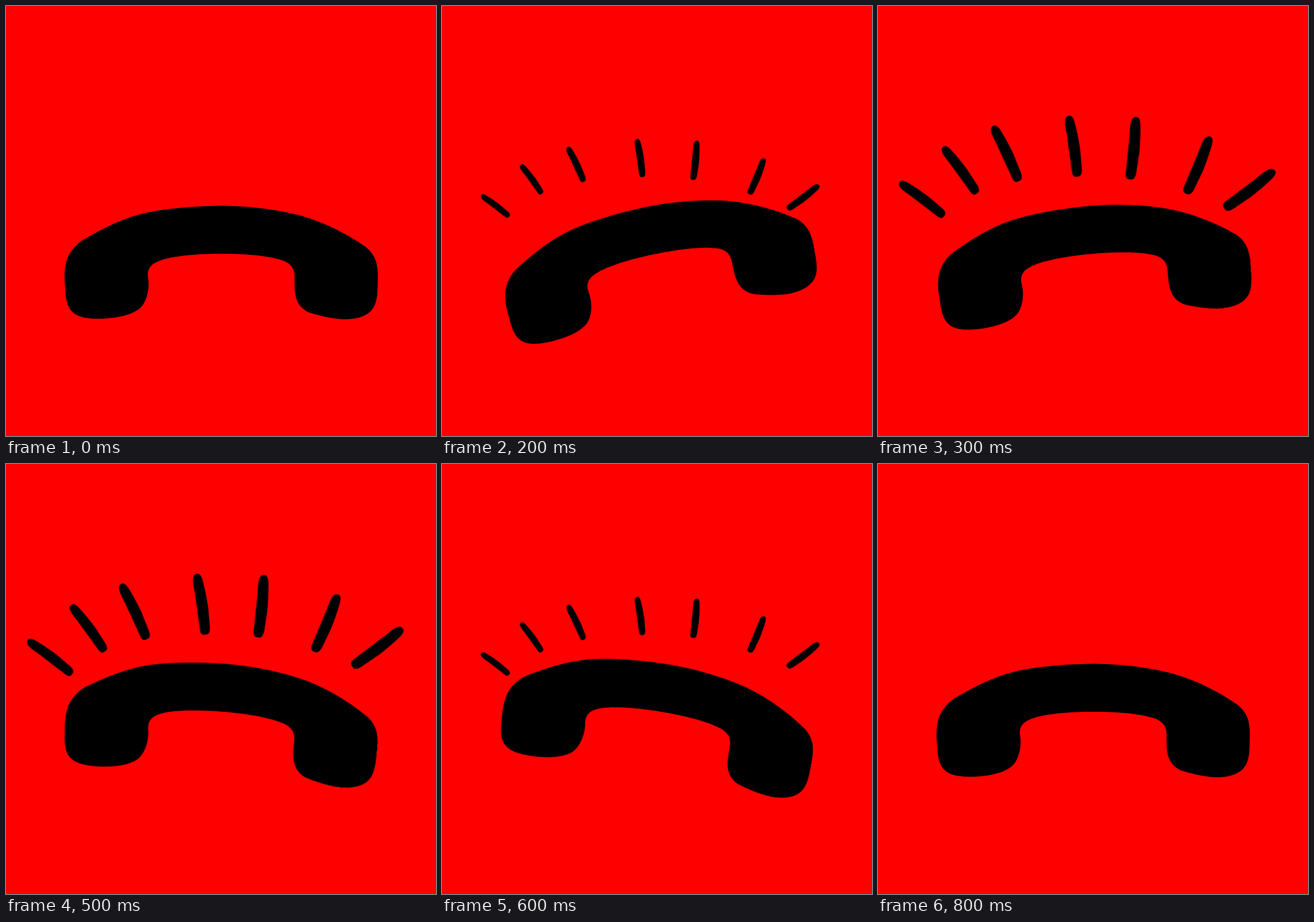
Recreate the animation shown at these times as an HTML page. Size 748 by 748 pixels, loop 1800 ms.

```html
<!DOCTYPE html>
<html lang="en">
<head>
<meta charset="utf-8">
<title>Ringing phone</title>
<style>
  html, body { margin: 0; width: 100%; height: 100%; overflow: hidden; background: #f00; }
  svg { display: block; width: 100vw; height: 100vh; }
  .handset { transform-origin: 375px 446px; animation: ring 1800ms step-end infinite; }
  .ray { transform: scale(0); animation: grow 1800ms step-end infinite; }

  /* one step is 100 ms = 5.555% */
  @keyframes ring {
    0%, 22.222%, 44.444%, 100% { transform: none; }
    5.555%, 16.666% { transform: rotate(-5deg); }
    11.111% { transform: rotate(-11.5deg); }
    27.777%, 38.888% { transform: translate(2px) rotate(4.8deg); }
    33.333% { transform: translate(4.5px) rotate(9.5deg); }
  }
  @keyframes grow {
    0%, 38.888%, 100% { transform: scale(0); }
    11.111%, 33.333% { transform: scale(.49); }
    16.666%, 27.777% { transform: scale(.78); }
    22.222% { transform: scale(1); }
  }
</style>
</head>
<body>
<svg viewBox="0 0 748 748">
  <defs>
    <!-- 140 units long, straight on the left, bowed on the right -->
    <path id="stroke" d="M0 0C-7 1 -11.3 -3 -11.3 -11L-11.3 -100C-13 -126 -12 -140 0 -140
      C7.5 -140 10 -130 11 -118Q14 -92 14.3 -62L12 -16C11 -4 7 1 0 0Z"/>
  </defs>
  <path class="handset" d="M134 407C178 381.5 210 366.5 250 358.5C290 351 335 347.5 378 347.5
    C430 348 490 356 530 370C565 382 600 401 621 416C632 422 643 436 645 450
    C648 465 646.5 475 646.5 485C646.5 520 639 532 620 540C595 549 565 545 527 533
    C507 524 502 507 502 485C501.5 478 502.5 473 501.5 464C499 451 490 444 472 440
    C445 433 410 431 375 431C340 431 305 433 277 440C256 446 245 453 247 472
    C250 487 247 507 238 520C227 536 195 544 158 544C112 544 104 525 103 490
    C101 472 101.5 460 104.5 446C108 432 120 415 134 407Z"/>
  <g id="rays"></g>
</svg>
<script>
  // foot x, foot y, angle from upright, length
  const rays = [
    [114, 364.5, -52.5, 125], [171, 325, -35.8, 128], [244, 304, -24.7, 136],
    [346, 296, -8, 137], [440, 301, 5.8, 140], [538, 326, 22.7, 138], [604, 352, 53, 141]
  ];

  // Rays grow from the corner of the foot nearest the middle of the handset
  document.getElementById('rays').innerHTML = rays.map(([x, y, angle, length]) => {
    const corner = `${x - 6 * Math.sign(angle)}px ${y + 3}px`;
    const place = `translate(${x} ${y}) rotate(${angle}) scale(${length / 140})`;
    return `<g class="ray" style="transform-origin: ${corner}">
      <use href="#stroke" transform="${place}"/></g>`;
  }).join('');
</script>
</body>
</html>
```
